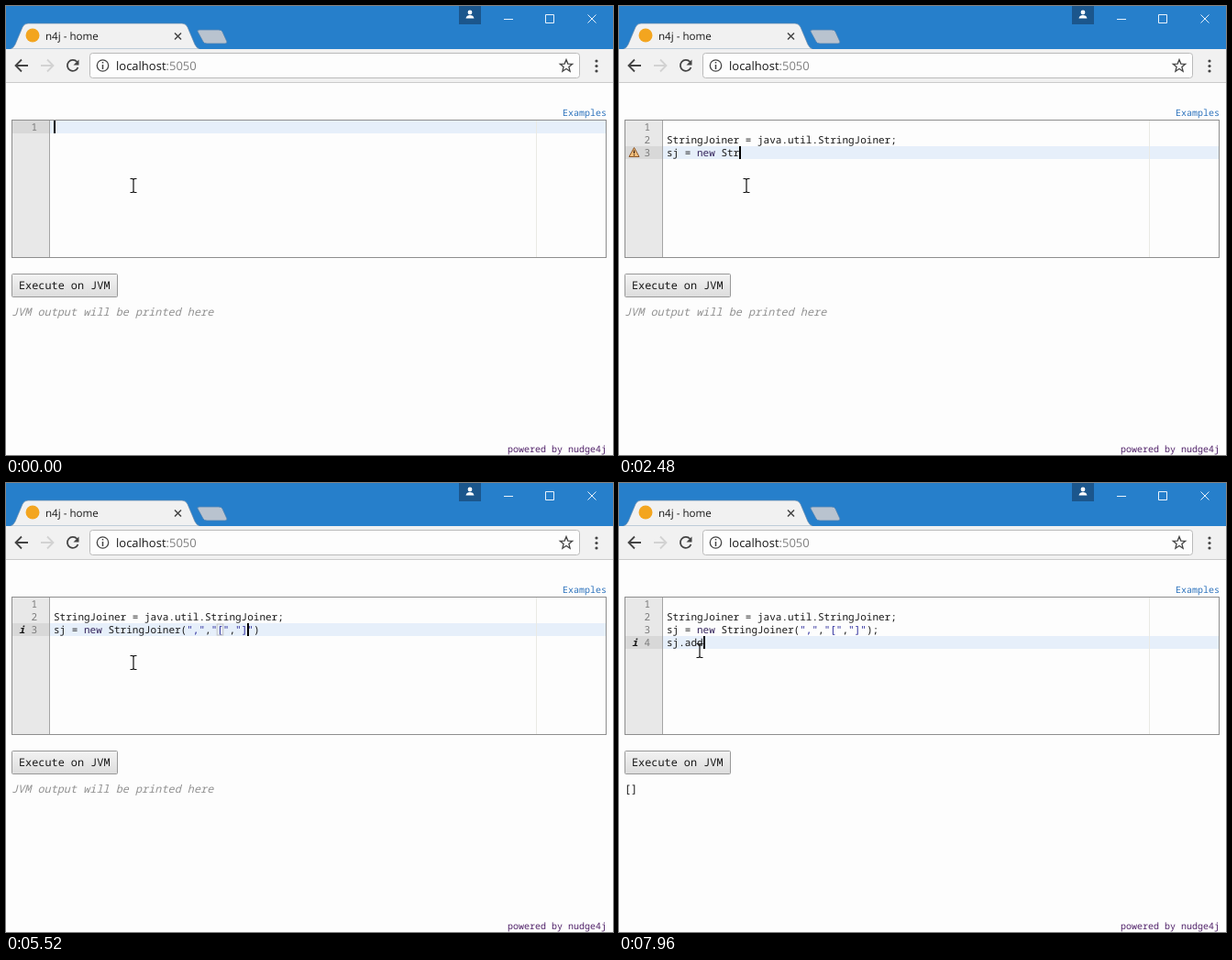
Animation, 662 px wide and 490 px high, one loop 8 s. Source, as an HTML page:

```html
<!DOCTYPE html>
<html lang="en">
<head>
<meta charset="utf-8">
<title>Code console</title>
<style>
  html, body { margin: 0; width: 100%; height: 100%; overflow: hidden; background: #fdfdfd; }
  svg { display: block; width: 662px; height: 490px; }
  text { white-space: pre; text-rendering: geometricPrecision; fill: #181818; }
  .mono { font-family: "Noto Sans Mono", "Liberation Mono", monospace; }
  .ui { font-family: "Open Sans", "Noto Sans", sans-serif; }
  .code { font-size: 11px; }
  .label { font-size: 11.85px; }
  .small { font-size: 10px; text-anchor: end; }
  .num { font-size: 11px; text-anchor: end; fill: #7c7c7c; }
  .kw { fill: #34245c; }
  .str { fill: #2a2a9c; }
  .hint { font-style: italic; fill: #929292; }
  .line { fill: none; stroke: #444; stroke-width: 1.8; }
  .win { fill: none; stroke: #eaf3fc; stroke-width: 1; }
</style>
</head>
<body>
<svg viewBox="0 0 662 490">
  <defs>
    <linearGradient id="face" x2="0" y2="1">
      <stop stop-color="#f3f3f3"/><stop offset="1" stop-color="#dcdcdc"/>
    </linearGradient>
  </defs>

  <!-- browser frame -->
  <rect width="662" height="48" fill="#267fcb"/>
  <path d="M5 47Q8 46 10 42L18 23Q20 19 24 19H192Q196 19 198 23L206 42Q208 46 211 47Z" fill="#f1f1f1" stroke="#5f87ac" stroke-width=".7"/>
  <path d="M211 26H232Q235 26 236 28L241 39Q241 41 239 41H219Q216 41 215 39L209 28Q208 26 211 26Z" fill="#b9c3cf" stroke="#4a80b4" stroke-width=".8"/>
  <circle cx="29" cy="32" r="7.5" fill="#f3a51f"/>
  <text class="ui" x="43" y="37" font-size="11.6">n4j - home</text>
  <path class="line" d="M184 29.5l7 7m0-7l-7 7" style="stroke-width:1.5"/>
  <rect x="494" width="24" height="20" fill="#1b568c"/>
  <circle cx="506" cy="7" r="2.4" fill="#fff"/>
  <path d="M501.5 13.5Q502 10 506 10T510.5 13.5Z" fill="#fff"/>
  <path class="win" d="M543 14.5H553M588.5 9.5h9v9h-9zM634.5 9.5l9 9m0-9l-9 9"/>

  <rect y="47" width="662" height="37" fill="#f1f1f1"/>
  <path d="M0 83.5H662" stroke="#cbcbcb"/>
  <path class="line" d="M24 65H11M17 58.5L10.5 65L17 71.5"/>
  <path class="line" d="M38 65H51M45 58.5L51.5 65L45 71.5" style="stroke:#d2d2d2"/>
  <path class="line" d="M77.5 61A6 6 0 1 0 78.5 67"/>
  <path d="M79.5 58.5V64.5H73.5Z" fill="#444"/>
  <rect x="91.5" y="51.5" width="534" height="27" rx="3" fill="#fdfdfd" stroke="#bababa"/>
  <circle class="line" cx="105.5" cy="65" r="6.2" style="stroke-width:1.3"/>
  <path class="line" d="M105.5 64V69M105.5 61V62.6" style="stroke-width:1.5"/>
  <text class="ui" x="120" y="70" font-size="13">localhost<tspan fill="#808080">:5050</tspan></text>
  <path id="star" class="line" style="stroke-width:1.3"/>
  <g fill="#444"><circle cx="644" cy="60" r="1.6"/><circle cx="644" cy="65.5" r="1.6"/><circle cx="644" cy="71" r="1.6"/></g>

  <!-- page -->
  <text class="mono small" x="655" y="120" style="fill:#2c72bc" font-weight="500">Examples</text>
  <rect x="7" y="125" width="40" height="149" fill="#e8e8e8"/>
  <rect id="gutterRow" x="7" width="40" height="14" fill="#d8d8d8"/>
  <rect id="activeRow" x="48" width="606" height="14" fill="#e6effa"/>
  <path d="M578.5 125V274" stroke="#e9e9e4"/>
  <path d="M47.5 125V274" stroke="#a4a4a4"/>
  <rect x="6.5" y="124.5" width="648" height="150" fill="none" stroke="#8e8e8e"/>
  <g id="rows" class="mono"></g>
  <rect id="match" width="6.6" height="12" fill="none" stroke="#c4c4c4"/>
  <rect id="caret" height="14"/>
  <text id="info" class="mono" x="14" font-size="11" font-style="italic" font-weight="600">i</text>
  <g id="warn">
    <path d="M16.5 -9.5L22 .5H11Z" fill="#f4c07c" stroke="#8a5527" stroke-linejoin="round"/>
    <path d="M16.5 -6.5V-3M16.5 -2V-.8" stroke="#3a2010" stroke-width="1.4"/>
  </g>

  <rect x="6.5" y="292.5" width="115" height="25" rx="1" fill="url(#face)" stroke="#989898"/>
  <text class="mono label" x="14" y="309">Execute on JVM</text>
  <text id="output" class="mono label" x="6" y="338"></text>
  <text class="mono small" x="655" y="487" style="fill:#4f2068">powered by nudge4j</text>

  <!-- mouse pointers -->
  <path id="beam" d="M-3.5 -7.5H-1L0 -6.5L1 -7.5H3.5M0 -6.5V6.5M-3.5 7.5H-1L0 6.5L1 7.5H3.5" fill="none" stroke="#111" stroke-width="1.2"/>
  <path id="arrow" d="M.5 .5V16.5L4.3 13L6.8 19L9.3 18L6.8 12.2H12Z" fill="#fff" stroke="#111"/>
</svg>
<script>
const LOOP = 8000, TOP = 125, ROW = 14, LEFT = 52, CHAR = 6.6;
const CLICK = 6720, REFOCUS = 7360;
const $ = id => document.getElementById(id);
const set = (el, attrs) => { for (const k in attrs) el.setAttribute(k, attrs[k]); };
const show = (el, on) => { el.style.display = on ? '' : 'none'; };

$('star').setAttribute('d', 'M' + Array.from({ length: 10 }, (_, i) => {
  const a = Math.PI * (i / 5 - .5), r = i % 2 ? 3 : 7;
  return `${(611 + r * Math.cos(a)).toFixed(1)} ${(65.5 + r * Math.sin(a)).toFixed(1)}`;
}).join('L') + 'Z');

// Typed runs: start, delay per key, keys
const runs = [
  [360, 0, '\n'],
  [680, 0, 'StringJoiner = java.util.StringJoiner;'],
  [880, 0, '\n'],
  [1120, 115, 'sj = new Str'],
  [2560, 105, 'ingJoiner(",'],
  [4040, 180, '","[","]'],
  [5580, 90, '");'],
  [5880, 0, '\n'],
  [6000, 100, 'sj'],
  [7480, 120, '.add']
];
const keys = runs.flatMap(([start, step, text]) =>
  [...text].map((ch, i) => ({ at: start + i * step, ch })));

// Gutter markers: time, line, kind
const marks = [[0, 0, ''], [1500, 3, 'i'], [2100, 3, 'w'], [3300, 3, 'i'], [6400, 4, 'i']];

// Mouse: time, x, y
const path = [
  [0, 139, 196], [6180, 139, 196], [6600, 64, 304], [6880, 64, 304],
  [7040, 70, 278], [7300, 88, 183], [LOOP, 88, 183]
];

function editor(t) {
  let before = '', after = '', last = 0;
  for (const { at, ch } of keys) {
    if (at > t) break;
    last = at;
    if ('")'.includes(ch) && after[0] === ch) after = after.slice(1);
    else if (ch === '"' || ch === '(') after = (ch === '(' ? ')' : '"') + after;
    before += ch;
  }
  return { before, after, last };
}

function matchColumn(head, line) {
  const ch = head.slice(-1), open = '([', close = ')]';
  if (!ch) return -1;
  if (close.includes(ch)) return head.lastIndexOf(open[close.indexOf(ch)]);
  if (open.includes(ch)) return line.indexOf(close[open.indexOf(ch)], head.length);
  return -1;
}

const colour = line => line
  .replace(/"[^"]*"?|\bnew\b/g, s => `<tspan class="${s === 'new' ? 'kw' : 'str'}">${s}</tspan>`);

function mouseAt(t) {
  const i = Math.max(1, path.findIndex(p => p[0] > t));
  const [t0, x0, y0] = path[i - 1], [t1, x1, y1] = path[i];
  const u = (t - t0) / (t1 - t0), e = u * u * (3 - 2 * u);
  return [x0 + (x1 - x0) * e, y0 + (y1 - y0) * e];
}

let drawn = null;
function drawEditor(t) {
  const { before, after, last } = editor(t);
  const lines = (before + after).split('\n');
  const head = before.split('\n').pop(), row = lines.length - 1;
  const y = TOP + row * ROW;
  const html = lines.map((line, i) => {
    const base = TOP + i * ROW + 11;
    return `<text class="num" x="34" y="${base}">${i + 1}</text>` +
      `<text class="code" x="${LEFT}" y="${base}">${colour(line)}</text>`;
  }).join('');
  if (html !== drawn) $('rows').innerHTML = drawn = html;

  set($('gutterRow'), { y });
  set($('activeRow'), { y });
  const blurred = t >= CLICK && t < REFOCUS;
  const wake = t >= REFOCUS ? Math.max(last, REFOCUS) : last;
  set($('caret'), {
    x: LEFT + Math.round(head.length * CHAR), y,
    width: blurred ? 1 : 2, fill: blurred ? '#858585' : '#000'
  });
  show($('caret'), blurred || (t - wake) % 1000 < 500);

  const col = matchColumn(head, lines[row]);
  show($('match'), col >= 0);
  set($('match'), { x: LEFT + col * CHAR, y: y + 1 });
}

function render(t) {
  drawEditor(t);

  const [, line, kind] = marks.filter(m => m[0] <= t).pop();
  const base = TOP + line * ROW - 3;
  show($('info'), kind === 'i');
  show($('warn'), kind === 'w');
  set($('info'), { y: base });
  set($('warn'), { transform: `translate(0 ${base})` });

  const done = t >= CLICK;
  $('output').textContent = done ? '[]' : 'JVM output will be printed here';
  $('output').classList.toggle('hint', !done);

  const [x, y] = mouseAt(t), inEditor = y < 275;
  show($('beam'), inEditor);
  show($('arrow'), !inEditor);
  set($(inEditor ? 'beam' : 'arrow'), { transform: `translate(${Math.round(x)} ${Math.round(y)})` });
}

const began = performance.now();
function tick() {
  render((performance.now() - began) % LOOP);
  requestAnimationFrame(tick);
}
tick();
</script>
</body>
</html>
```
